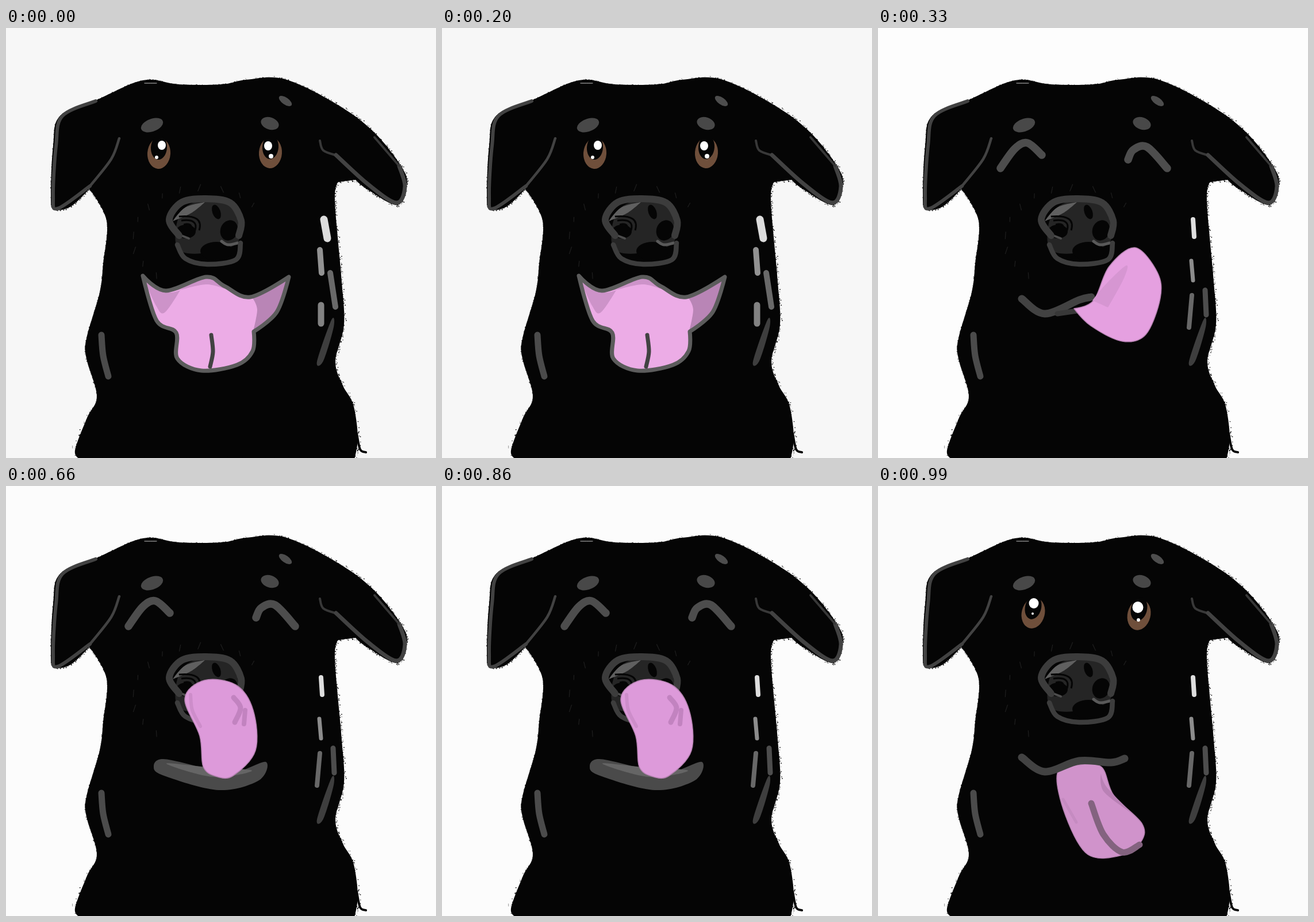
An HTML page that plays this animation: 748 by 748 pixels, repeating every 1.32 s.

```html
<!DOCTYPE html>
<html lang="en">
<head>
<meta charset="utf-8">
<title>Happy black dog</title>
<style>
  html, body { margin: 0; width: 100%; height: 100%; overflow: hidden; }
  svg { display: block; width: 100vw; height: 100vh; }
</style>
</head>
<body>
<svg id="stage" viewBox="0 0 748 748"></svg>
<script>
const stage = document.getElementById('stage');
const POSE_MS = 330;
const INK = '#050505';
const GRAY = '#424242';
const LIGHT = '#4d4d4d';
const BACKGROUNDS = ['#f7f7f7', '#fdfdfd', '#fcfcfc', '#fbfbfb'];

// Smooth curve through "x,y" points; a trailing "!" makes a corner.
function curve(text, closed) {
  const pts = text.trim().split(/\s+/).map(word => {
    const [x, y] = word.replace('!', '').split(',').map(Number);
    return { x, y, corner: word.endsWith('!') };
  });
  const n = pts.length;
  const at = i => closed ? pts[(i + n) % n] : pts[Math.max(0, Math.min(n - 1, i))];
  const slope = i => at(i).corner ? [0, 0]
    : [(at(i + 1).x - at(i - 1).x) / 6, (at(i + 1).y - at(i - 1).y) / 6];
  let d = `M${pts[0].x} ${pts[0].y}`;
  for (let i = 0; i < (closed ? n : n - 1); i++) {
    const a = at(i), b = at(i + 1), s = slope(i), e = slope(i + 1);
    d += `C${a.x + s[0]} ${a.y + s[1]} ${b.x - e[0]} ${b.y - e[1]} ${b.x} ${b.y}`;
  }
  return d + (closed ? 'Z' : '');
}

const shape = (pts, fill, edge = 'none', width = 2) =>
  `<path d="${curve(pts, true)}" fill="${fill}" stroke="${edge}" stroke-width="${width}" stroke-linejoin="round"/>`;
const line = (pts, color, width) =>
  `<path d="${curve(pts)}" fill="none" stroke="${color}" stroke-width="${width}" stroke-linecap="round" stroke-linejoin="round"/>`;
const oval = (x, y, rx, ry, fill, turn = 0) =>
  `<ellipse cx="${x}" cy="${y}" rx="${rx}" ry="${ry}" fill="${fill}" transform="rotate(${turn} ${x} ${y})"/>`;
const tongue = (pts, fill) => shape(pts, fill, '#b582b1', 1.5);

let seed = 7;
function random() {
  seed = (seed * 16807) % 2147483647;
  return seed / 2147483647;
}
const jitter = size => (random() + random() - 1) * size;

const outline = curve(`130,750! 120,735 141,678 158,640 140,575 140,540 163,460 169,410 175,335
  145,280! 112,311 83,315 78,290 82,205 94,153 160,124 238,91 300,98 375,98 418,90 485,89
  576,133 640,181 689,243 697,275 680,308 626,279 608,264! 578,268! 572,300 583,430 588,515
  573,580 586,622 604,655 612,712 606,750!`, true);

// Brush grain: coarse on the right side, loose near the bottom.
function fur() {
  const path = document.createElementNS('http://www.w3.org/2000/svg', 'path');
  path.setAttribute('d', outline);
  const length = path.getTotalLength();
  let d = '';
  for (let i = 0; i < 1500; i++) {
    const { x, y } = path.getPointAtLength(random() * length);
    const spread = y > 670 ? 7 : x > 400 ? 3.5 : 1.5;
    const size = 0.6 + random();
    d += `M${(x + jitter(spread)).toFixed(1)} ${(y + jitter(spread)).toFixed(1)}h${size}v${size}h${-size}z`;
  }
  return `<path d="${d}" fill="${INK}"/>`;
}

function body() {
  return `<path d="${outline}" fill="${INK}"/>` + fur()
    + line('610,705 616,733 626,738', INK, 4)
    + line('241,96 262,96', '#ccc', 1);
}

// Faint dry-brush strokes around the muzzle.
function scratches() {
  let marks = '';
  for (let i = 0; i < 12; i++) {
    const a = 2.3 + i * 0.3;
    const x = 340 + 118 * Math.cos(a), y = 360 + 88 * Math.sin(a);
    marks += line(`${x},${y} ${x + jitter(8)},${y + 5 + random() * 7}`, '#1f1f1f', 1.2);
  }
  return marks;
}

function ears() {
  return line('156,127 98,153 87,205 82,292 90,314 146,275', GRAY, 6)
    + line('146,275 183,228 197,192', GRAY, 4.5)
    + line('546,196 552,213 576,222', '#383838', 4)
    + line('574,221 630,272 679,304 694,276 684,240', GRAY, 7)
    + line('684,240 641,190', '#383838', 4);
}

function marks() {
  return oval(254, 169, 20, 11, '#484848', -20) + oval(459, 166, 16, 10.5, '#484848', 18)
    + oval(486, 127, 13, 6, LIGHT, 35)
    + line('166,534 169,570 178,606', '#4b4b4b', 11)
    + shape('566,508 570,520 552,579 541,580', '#3e3e3e');
}

function nose() {
  let wrinkles = '';
  for (let r = 8; r <= 22; r += 7) {
    wrinkles += `<path d="M${314 - r * 0.6} ${350 - r}Q${314 + r * 1.4} ${346 - r} ${314 + r} 352" fill="none" stroke="${INK}" stroke-width="3"/>`;
  }
  return shape('296,345 312,312 348,300 390,310 404,342 400,376 340,392 300,385', '#252525')
    + shape('290,336! 312,312 346,303! 322,322', '#606060')
    + oval(313, 354, 17, 12, INK) + oval(388, 352, 15, 18, INK, 20)
    + oval(366, 320, 7, 13, INK, -20) + oval(366, 388, 28, 16, INK)
    + wrinkles
    + line('297,358 318,366', LIGHT, 4) + line('375,371 386,377 403,374', '#595959', 5)
    + line('301,361 284,333 306,303 348,297 390,304 409,335 405,361', '#3c3c3c', 12)
    + line('298,377 312,401 350,411 400,403 408,374', '#3d3d3d', 8.5);
}

function shine(open) {
  return open
    ? line('553,333 559,366', '#dcdcdc', 13) + line('546,386 549,426', '#929292', 10)
      + line('564,426 573,485', '#696969', 10) + line('548,482 548,514', '#828282', 11)
    : line('548,333 550,363', '#dedede', 8) + line('545,405 548,439', '#8c8c8c', 7)
      + line('546,465 541,521', '#686868', 8) + line('569,456 571,499', LIGHT, 9);
}

function eye(x, y, tilt, glint, spark) {
  return oval(x, y, 20, 27, '#6f4f3b', tilt) + oval(x, y - 10, 14, 21, INK, tilt)
    + oval(...glint, '#fff') + oval(...spark, '#fff');
}

const closedEyes = () =>
  line('213,244 238,210 260,200 285,221', LIGHT, 13.5)
  + line('435,229 444,212 468,207 503,244', LIGHT, 13.5);

function panting() {
  const mouth = `238,431! 278,457 348,433 380,449 425,468 492,433! 471,494 431,528! 429,562
    402,586 340,596 298,575 296,530 262,509`;
  return eye(266, 218, 4, [271, 204, 7, 8], [262, 225, 3, 3])
    + eye(460, 217, 4, [456, 205, 7, 8], [461, 223, 4, 4])
    + shape(mouth, '#ecace6')
    + shape('239,434! 278,459 303,456! 276,495 261,483', '#cd93c9')
    + shape('302,456! 348,435 381,454! 348,446', '#cd93c9')
    + shape('429,470! 491,436! 470,492 430,527! 437,490', '#b985b6')
    + shape(mouth, 'none', '#5c5c5c', 7)
    + line('357,534 360,563 355,589', GRAY, 7);
}

function lickSide() {
  return closedEyes()
    + line('250,471 290,497 350,473 371,468', GRAY, 13)
    + line('312,497 346,492', '#383838', 9)
    + tongue('341,488! 375,474 402,415 447,382 486,425 491,470 466,533 425,545 370,518', '#e5a0e0')
    + shape('432,413 396,446 373,474! 400,486! 427,437', '#d696d2');
}

function lickNose() {
  return closedEyes()
    + shape('257,488 274,475 345,490 400,497 452,480 440,512 370,529 275,504', '#4a4a4a')
    + shape('279,483 350,489 428,495 360,506', '#656565')
    + tongue('311,370 345,338 400,346 430,390 434,460 395,504 365,505 343,488 337,435', '#dd9ada')
    + line('321,363 324,390 338,418', '#cd8dca', 6)
    + line('396,368 408,386 398,411', '#c283c0', 9)
    + line('416,390 414,414', '#c283c0', 8);
}

function tongueOut() {
  return eye(270, 221, 14, [271, 204, 8.5, 9], [269, 222, 2, 2])
    + eye(454, 224, 14, [452, 211, 9.5, 10], [453, 233, 3, 3])
    + tongue('312,500 350,485 389,489 410,538 459,587 458,618 425,642 365,641 326,573', '#d093cb')
    + shape('388,500! 398,524 443,570! 393,532', '#b981b5')
    + line('322,545 345,585', '#c58bc1', 5)
    + line('371,552 392,606 425,637 455,624', '#83637f', 11)
    + line('250,472 290,497 350,478 405,481 429,474', GRAY, 13);
}

const poses = [panting, lickSide, lickNose, tongueOut];
stage.innerHTML = '<rect id="paper" width="748" height="748"/>'
  + body() + scratches() + ears() + marks() + nose()
  + poses.map((draw, i) => `<g class="pose">${shine(i === 0)}${draw()}</g>`).join('');

const paper = document.getElementById('paper');
const groups = [...stage.querySelectorAll('.pose')];
const start = performance.now();

function render(now) {
  const elapsed = Math.max(0, now - start);
  const current = Math.floor(elapsed / POSE_MS) % poses.length;
  paper.setAttribute('fill', BACKGROUNDS[current]);
  groups.forEach((group, i) => group.setAttribute('display', i === current ? 'inline' : 'none'));
  requestAnimationFrame(render);
}
render(start);
</script>
</body>
</html>
```
